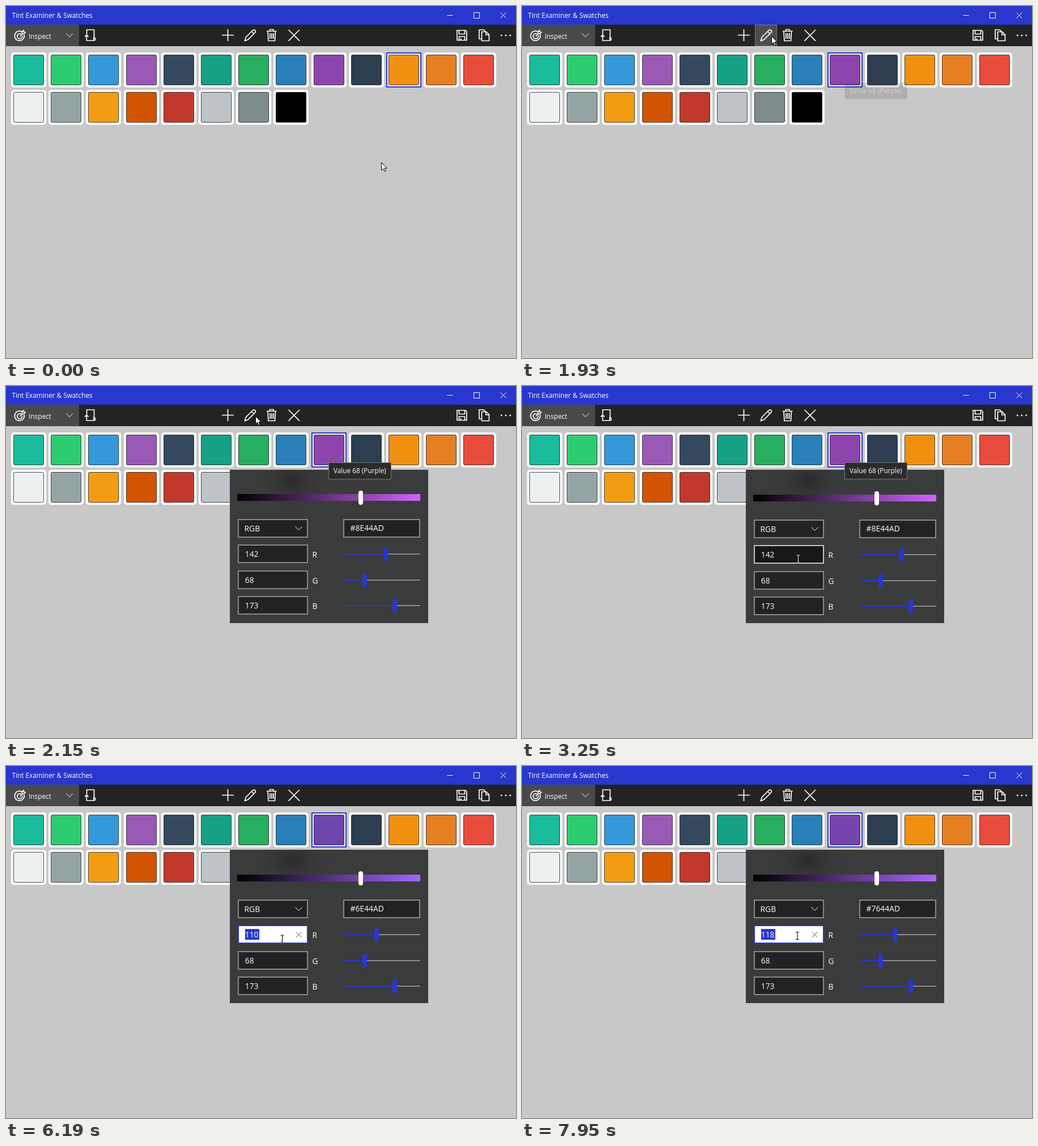
An HTML page for the animation above (8 s loop, 900x622 px).

```html
<!DOCTYPE html>
<html lang="en">
<head>
<meta charset="utf-8">
<title>Tint Examiner &amp; Swatches</title>
<style>
  html, body { margin: 0; width: 100%; height: 100%; overflow: hidden; background: #c8c8c8; }
  svg { display: block; }
  text { font-family: "Open Sans", "Noto Sans", sans-serif; font-size: 11.8px; fill: #fff; white-space: pre; }
  .big { font-size: 13.9px; }
  .icon { fill: none; stroke: #fff; stroke-width: 1.7; }
  .thin { fill: none; stroke: #fff; stroke-width: 1; }
  .field { fill: #222; stroke: #888; stroke-width: 2; }
  .field.hover { fill: #171717; stroke: #c4c4c4; }
  .field.focus { fill: #fff; stroke: #2837cd; }
  .beam { fill: none; stroke: #fff; stroke-width: 1.1; mix-blend-mode: difference; }
</style>
</head>
<body>
<svg id="stage" width="900" height="622">
  <defs>
    <linearGradient id="shade"><stop stop-color="#000"/><stop id="bright" offset="1"/></linearGradient>
    <radialGradient id="blur">
      <stop stop-color="#2a2a2a"/><stop offset="1" stop-color="#393939" stop-opacity="0"/>
    </radialGradient>
    <clipPath id="inside"><rect x="395" y="148" width="350" height="271"/></clipPath>
  </defs>
</svg>
<script>
const LOOP = 8000, TICK = 109.4, PHASE = 51;
const ACCENT = '#2837cd';
const stage = document.getElementById('stage'), bright = document.getElementById('bright');

const set = (el, attrs) => { for (const key in attrs) el.setAttribute(key, attrs[key]); };
function add(parent, tag, attrs, label) {
  const el = document.createElementNS('http://www.w3.org/2000/svg', tag);
  set(el, attrs);
  if (label !== undefined) el.textContent = label;
  return parent.appendChild(el);
}
const rect = (parent, x, y, width, height, fill, more) =>
  add(parent, 'rect', { x, y, width, height, fill, ...more });
const path = (parent, cls, d, more) => add(parent, 'path', { class: cls, d, ...more });
const text = (parent, x, y, label, cls = '') => add(parent, 'text', { x, y, class: cls }, label);
const show = (el, on) => { el.style.display = on ? '' : 'none'; };

// Path pieces built around a centre.
const plus = (x, y, r) => `M${x - r} ${y}h${2 * r}M${x} ${y - r}v${2 * r}`;
const cross = (x, y, r) => `M${x - r} ${y - r}l${2 * r} ${2 * r}M${x + r} ${y - r}l${-2 * r} ${2 * r}`;
const square = (x, y, r) => `M${x - r} ${y - r}h${2 * r}v${2 * r}h${-2 * r}z`;
const chevron = (x, y) => `M${x - 6} ${y - 3}l6 6 6-6`;

// Title bar
rect(stage, 0, 0, 900, 33, ACCENT);
text(stage, 10.5, 21, 'Tint Examiner & Swatches');
path(stage, 'thin', 'M778.5 16.5h10' + square(830.5, 16.5, 5) + cross(877.5, 16.5, 5));

// Command bar
rect(stage, 0, 33, 900, 38, '#222323');
rect(stage, 0, 33, 129, 38, '#484949');
text(stage, 40, 58, 'Inspect');
path(stage, 'thin', chevron(112, 51.5));
const lit = rect(stage, 411.5, 33.5, 38, 37, '#4d4d4d', { stroke: '#777' });
[
  'M29 46a8.500 8.500 0 1 0 3 4.500M26.500 49.500a4.500 4.500 0 1 0 2 2.500M24.500 53.500l4-4v-4l2.500-2.500 .5 3 2.500 .5-2.500 3h-3',
  'M142.500 50v-8h13v14.500M139 54.500l3.300-3.500 3.300 3.500M142.300 52v9h12.500a2.700 2.700 0 1 0 0-5.400v5.400',
  plus(391.5, 51.5, 10.5),
  'M421.500 61.500l1.800-6.300 12.200-12.200q2-1.800 4 0t0 4l-12.200 12.200zM433.500 45l4 4',
  'M460 44.500h17.500M465.500 44v-2.500h6.500v2.500M462 45l1 16.500h11.500l1-16.500' + [466, 469, 472].map(x => `M${x} 48v10`).join(''),
  cross(508.3, 51.8, 9.8),
  'M796 43h15l2 2v15.500h-17zM799.500 43v6.500h10v-6.500M799.500 60.500v-6.500h10v6.500M802.500 57v3.500',
  'M839 58h-4v-16h8l3 3M839.500 45.500h8l5 5v11h-13zM847 46v5h5'
].forEach(d => path(stage, 'icon', d));
for (const x of [874.3, 882, 889.7]) add(stage, 'circle', { cx: x, cy: 52, r: 1.4, fill: '#fff' });

// Swatches
const colors = ('1abc9c 2ecc71 3498db 9b59b6 34495e 16a085 27ae60 2980b9 8e44ad 2c3e50 f19010 e67e22 e74c3c ' +
  'ecf0f1 95a5a6 f39c12 d35400 c0392b bdc3c7 7f8c8d 000000').split(' ');
const tiles = colors.map((color, i) => {
  const x = Math.round(9 + (i % 13) * 66.2), y = i < 13 ? 82 : 148;
  return {
    frame: rect(stage, x + 1, y + 1, 60, 60, '#fff', { 'stroke-width': 2 }),
    fill: rect(stage, x + 4.5, y + 4.5, 53, 53, '#' + color, { rx: 2, stroke: '#000', 'stroke-opacity': .7 })
  };
});

// Colour flyout: the backdrop stays put while the content slides in.
const panel = add(stage, 'g', { 'clip-path': 'url(#inside)' });
rect(panel, 395, 148, 350, 271, '#3a3b3b');
rect(panel, 435, 120, 140, 95, 'url(#blur)');
const content = add(panel, 'g', {});
const field = (x, y, width) => rect(content, x, y, width, 31, '', { class: 'field' });

rect(content, 408, 192, 323, 12, 'url(#shade)');
rect(content, 622, 186, 8, 25, '#fff', { rx: 4 });
field(410, 237, 122);
text(content, 420.5, 257.5, 'RGB', 'big');
path(content, 'thin', chevron(516.5, 252.5));
const hexBox = field(596, 237, 134), hex = text(content, 607.5, 257, '', 'big');

function channel(name, i) {
  const y = Math.round(298 + i * 45.5);
  const box = field(410, y - 16, 122);
  const mark = rect(content, 422, y - 10, 25, 19, ACCENT);
  const clear = path(content, '', cross(516.5, y, 4.8), { stroke: '#555' });
  const label = text(content, 421.7, y + 5, '', 'big');
  text(content, 540.5, y + 6, name, 'big');
  rect(content, 595, y - 1, 136, 2, '#8a8a8a');
  const track = rect(content, 595, y - 1, 0, 2, ACCENT);
  const thumb = rect(content, 0, y - 12, 8, 24, ACCENT, { rx: 4 });
  return {
    box,
    update(value, focused) {
      const x = Math.round(599 + value / 2);
      label.textContent = value;
      set(track, { width: x - 595 });
      set(thumb, { x: x - 4 });
      show(mark, focused);
      show(clear, focused);
    }
  };
}
const channels = ['R', 'G', 'B'].map(channel);

const tip = add(stage, 'g', {});
rect(tip, 569.5, 135.5, 110, 29, '#2b2b2b', { stroke: '#767676' });
text(tip, 578, 154, 'Value 68 (Purple)');

const arrow = path(stage, '', 'M.5 .5v13.800l3.200-3 2.300 5.200 2.200-1-2.300-5h4.200z', { fill: '#fff', stroke: '#000' });
const beam = path(stage, 'beam', 'M-3-6.500h2q1 0 1 1 0-1 1-1h2M0-5.500v11M-3 6.500h2q1 0 1-1 0 1 1 1h2');

// Motion: [time, ...values] key points joined by an easing.
const linear = u => u, smooth = u => u * u * (3 - 2 * u);
function along(keys, t, ease) {
  const next = keys.findIndex(key => key[0] > t);
  if (next < 1) return keys.at(next).slice(1);
  const a = keys[next - 1], b = keys[next], u = ease((t - a[0]) / (b[0] - a[0]));
  return a.slice(1).map((v, i) => v + (b[i + 1] - v) * u);
}
const pointerPath = [[PHASE, 662, 276], [820, 585, 129], [1150, 580, 125], [1700, 440, 53], [2260, 440, 53],
  [2590, 622, 260], [2900, 507, 329], [3220, 487.5, 305.5], [6850, 487.5, 305.5], [6950, 486, 300]];
const redPath = [[3680, 142], [4870, 132], [6190, 110], [6500, 110], [6850, 104], [7180, 104], [7950, 118]];

function over(el, [px, py]) {
  const [x, y, w, h] = ['x', 'y', 'width', 'height'].map(key => +el.getAttribute(key));
  return px > x && px < x + w && py > y && py < y + h;
}

function draw(time) {
  const t = Math.max(0, PHASE + Math.floor((time - PHASE) / TICK) * TICK);
  const pos = along(pointerPath, t, smooth);
  const red = Math.round(along(redPath, t, linear)[0]);
  const open = t > 2000, focused = t > 3650, selected = t < 930 ? 10 : 8;

  tiles.forEach(({ frame }, i) => {
    const on = i === selected, base = !on && !open && over(frame, pos) ? '#e8e8e8' : '#fff';
    set(frame, { rx: on ? 0 : 4, fill: base, stroke: on ? ACCENT : base });
  });
  show(lit, !open && over(lit, pos));

  const peak = 255 / 173;
  set(tiles[8].fill, { fill: `rgb(${red},68,173)` });
  set(bright, { 'stop-color': `rgb(${Math.round(red * peak)},${Math.round(68 * peak)},255)` });
  hex.textContent = '#' + red.toString(16).toUpperCase() + '44AD';
  [red, 68, 173].forEach((value, i) => channels[i].update(value, focused && i === 0));

  const boxes = [hexBox, ...channels.map(c => c.box)];
  const hot = open && boxes.find(box => over(box, pos));
  for (const box of boxes) set(box, { class: box === hot ? `field ${focused ? 'focus' : 'hover'}` : 'field' });

  show(panel, open);
  set(content, { transform: `translate(0 ${Math.min(0, Math.round((t - 2150) / 16))})` });
  set(tip, { opacity: focused ? 0 : Math.min(1, Math.max(0, (t - 1880) / 200)) });

  show(arrow, !hot);
  show(beam, hot);
  set(hot ? beam : arrow, { transform: `translate(${pos})` });
}

function tick() {
  draw(performance.now() % LOOP);
  requestAnimationFrame(tick);
}
tick();
</script>
</body>
</html>
```
